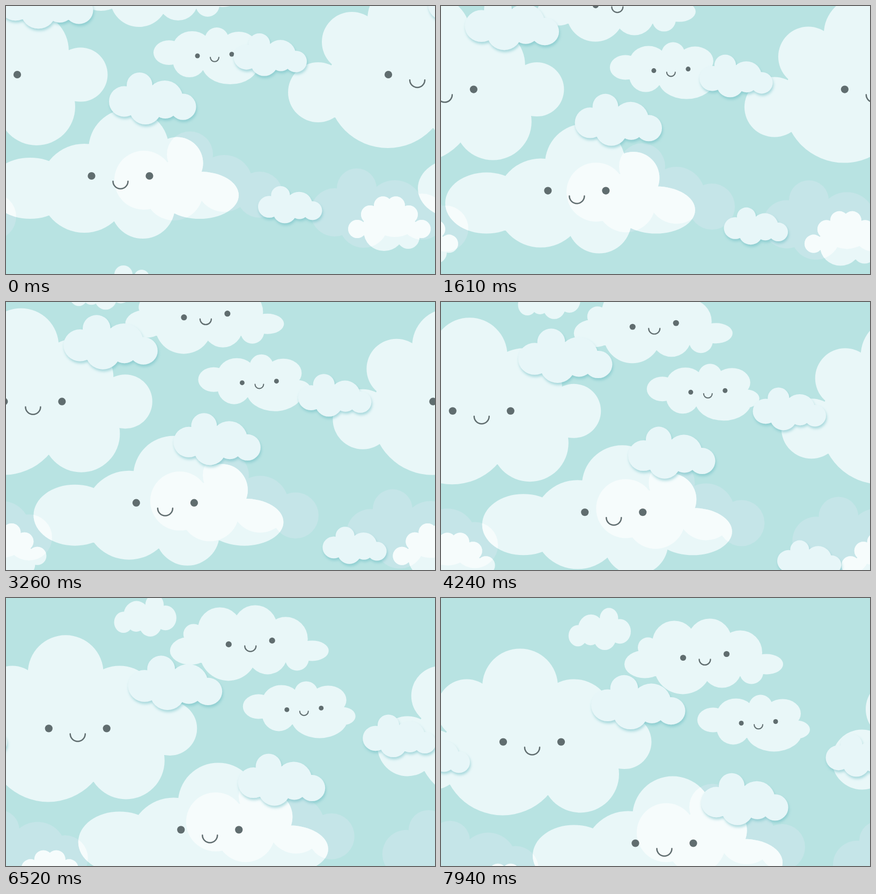
Animation, 800 px wide and 500 px high, one loop 8 s. Source, as an HTML page:

```html
<!DOCTYPE html>
<html lang="en">
<head>
<meta charset="utf-8">
<title>Drifting clouds</title>
<style>
  html, body { margin: 0; width: 100%; height: 100%; overflow: hidden; background: #b8e3e2; }
  svg { display: block; width: 100vw; height: 100vh; }
</style>
</head>
<body>
<svg viewBox="0 0 800 500">
  <defs>
    <clipPath id="faceClip"><path id="clipShape"/></clipPath>
    <filter id="shadow" filterUnits="userSpaceOnUse" x="-900" y="-300" width="2600" height="1000">
      <feDropShadow dx="1.5" dy="4" stdDeviation="2.6" flood-color="#62b9c0" flood-opacity=".48"/>
    </filter>
  </defs>
  <rect width="800" height="500" fill="#b8e3e2"/>
  <path id="haze" fill="#c5e5e8"/>
  <path id="clouds" fill="#e9f7f8"/>
  <g clip-path="url(#faceClip)"><path id="glow" fill="#f6fcfc"/></g>
  <g id="faces" fill="#606d6f" stroke="#606d6f"></g>
  <g id="front"><path id="puffs" fill="#e7f6f8" filter="url(#shadow)"/></g>
</svg>
<script>
const LOOP = 8000, TILE = 800;
const COPIES = [-TILE, 0, TILE];
const $ = id => document.getElementById(id);

// A cloud is a clockwise ring of lobes [cx, cy, rx, ry = rx], filled through their centres.
const lobe = ([x, y, rx, ry = rx]) =>
  `M${x - rx} ${y}a${rx} ${ry} 0 1 1 ${2 * rx} 0a${rx} ${ry} 0 1 1 ${-2 * rx} 0z`;
const core = ring => 'M' + ring.map(([x, y]) => `${x} ${y}`).join('L') + 'z';
const cloud = ring => ring.map(lobe).join('') + core(ring);
const tiled = rings => COPIES.map(dx =>
  rings.map(ring => cloud(ring.map(([x, ...rest]) => [x + dx, ...rest]))).join('')).join('');

// Equal lobes along a sine arch.
const arch = (x, y, width, height, n, r) => Array.from({ length: n }, (_, i) => {
  const u = i / (n - 1);
  return [x + width * u, y - height * Math.sin(Math.PI * u), r];
});

// One small cloud serves at several sizes; a negative sx mirrors it.
const PUFF = [[28.5, 54, 28.5], [57, 24, 24], [104, 49, 34], [138, 64, 24.5], [105, 62, 24], [68, 67, 30]];
function puff(x, y, sx, sy) {
  const ring = PUFF.map(([cx, cy, r]) => [x + cx * sx, y + cy * sy, r * Math.abs(sx), r * sy]);
  return sx < 0 ? ring.reverse() : ring;
}

const giant = [[-155, 67, 56], [-55.5, 24.5, 70.5], [45, 83, 72], [139, 128, 50.5],
  [57, 188, 72], [-88, 152, 113], [-218, 161, 56]];
const wide = [[45, 340, 77, 57], [146, 340, 83], [229, 267, 75], [319, 293, 48.5],
  [361, 353, 73, 44], [255, 374, 60]];
const upper = [[177, -17, 38, 26], [183, -48, 19], [232, -57, 41], [298, -61, 41], [355, -39, 41],
  [404, -17, 31, 19], [376, -2, 22], [321, -10, 37], [248, -15, 54]];
const middle = [[304, 87, 29, 23], [347, 78, 36, 31], [393, 62, 22], [434, 75, 34, 27],
  [460, 105, 25, 17], [418, 108, 53, 38], [342, 102, 31]];
const bright = [...arch(655, 416, 120, 46, 6, 17), [750, 432, 21], [705, 420, 38, 37]];
const sinking = [[219, 501, 17], [253, 506, 14]];
const tiny = puff(151, -122, -0.715, 0.81);

const haze = [
  [[257, 325, 55], [343, 277, 43], [407, 331, 53], [473, 352, 43], [313, 345, 55]],
  [[613, 385, 45], [654, 340, 37], [725, 378, 53], [776, 393, 43], [667, 405, 46]]];
const puffs = [puff(-13, -59, 1.08, 1.045), puff(192, 124, 1, 1),
  puff(424.5, 51, 0.84, 0.82), puff(470, 336, 0.735, 0.715)];

// Centred on the mouth; the size k also sets eye and line, and tilt lifts the right eye.
function face(x, y, gap, tilt, k) {
  const m = 14 * k;
  const eye = side => `<circle cx="${x + side * gap / 2}" cy="${y - side * tilt / 2}" r="${1 + 6.1 * k}" stroke="none"/>`;
  return eye(-1) + eye(1) +
    `<path d="M${x - m} ${y + 10 * k ** 1.5}a${m} ${m} 0 0 0 ${2 * m} 0" fill="none" stroke-width="${1.4 + 1.1 * k}" stroke-linecap="round"/>`;
}
const faces = face(-33, 128, 108, 0, 1) + face(213.5, 317, 108, 0, 1) +
  face(289, -32.5, 81, 7, 0.75) + face(389, 91.5, 64, 3, 0.57);

const bodies = tiled([giant, wide, upper, middle, tiny, bright, sinking]);
const mist = tiled(haze);
const shapes = { clouds: bodies, clipShape: bodies, haze: mist, glow: mist, puffs: tiled(puffs) };
for (const id in shapes) $(id).setAttribute('d', shapes[id]);
$('faces').innerHTML = COPIES.map(dx => `<g transform="translate(${dx})">${faces}</g>`).join('');

// Pixels to the right per step; every layer sinks along the same slope.
const SLOPE = 0.692;
const DRIFT = { haze: 2.91, glow: 2.91, clouds: 3.625, clipShape: 3.625, faces: 3.625, front: 5.232 };

// The picture moves in short holds: each run starts at a key time and has eight even steps.
const RUNS = [150, 1310, 2400, 3540, 4650, 5770, 6940, 8080];
function stepAt(ms) {
  const run = RUNS.findLastIndex(t => t <= ms);
  if (run < 0) return 0;
  const u = (ms - RUNS[run]) / (RUNS[run + 1] - RUNS[run]);
  return 1 + 8 * run + Math.min(7, Math.floor(8 * u + 0.22));
}

function draw(ms) {
  const step = stepAt(ms);
  for (const id in DRIFT) {
    const x = DRIFT[id] * step;
    $(id).setAttribute('transform', `translate(${x} ${x * SLOPE})`);
  }
}

const start = performance.now();
function loop() {
  draw((performance.now() - start) % LOOP);
  requestAnimationFrame(loop);
}
loop();
</script>
</body>
</html>
```
